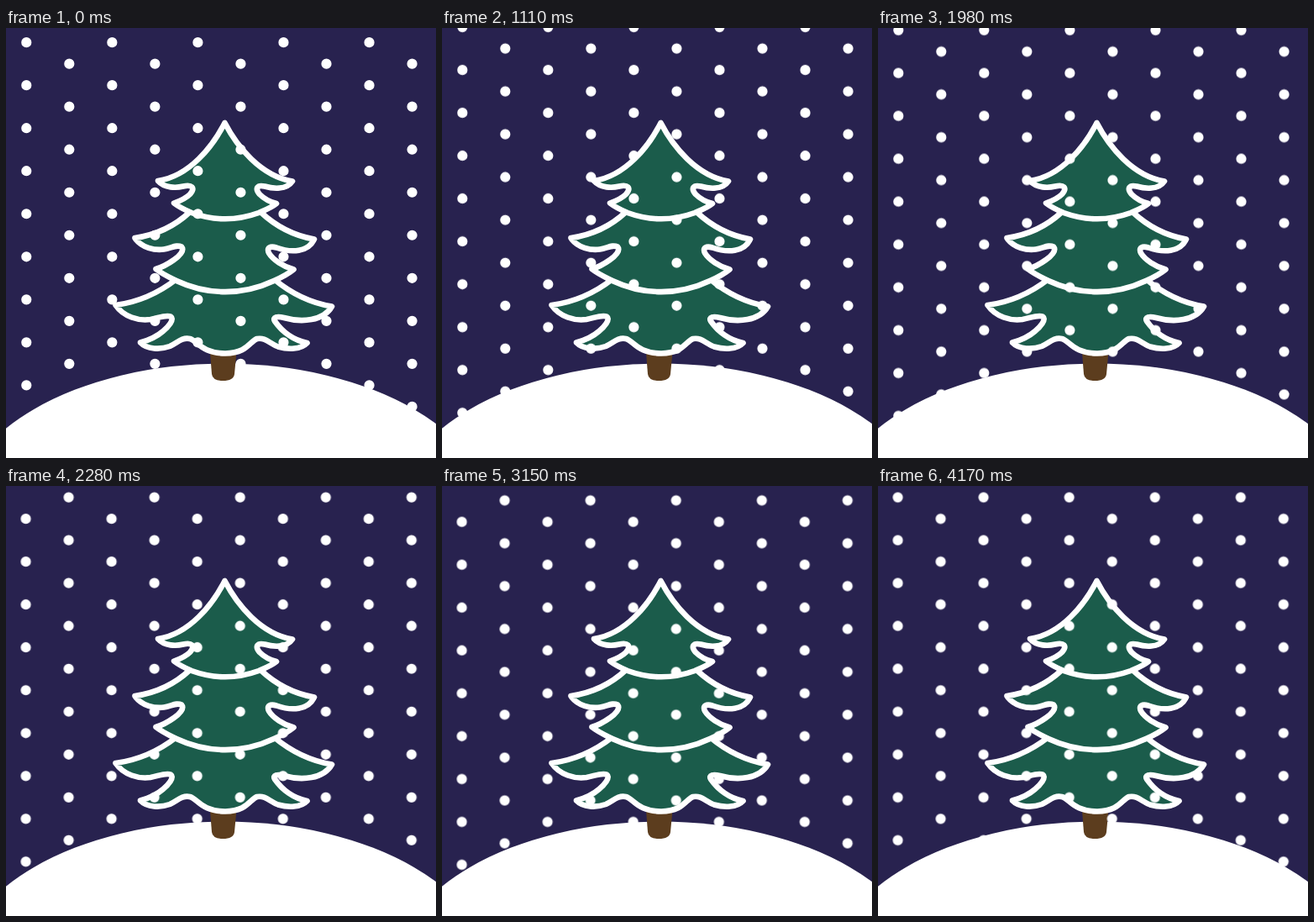
An HTML page that plays this animation: 512x512 px, repeating every 4.2 s.

```html
<!DOCTYPE html>
<html lang="en">
<head>
<meta charset="utf-8">
<title>Snowy tree</title>
<style>
  html, body { margin: 0; width: 100%; height: 100%; overflow: hidden; background: #28224f; }
  svg { display: block; width: 100vw; height: 100vh; }
  .tier { fill: #1b5c4b; stroke: #fff; stroke-width: 6.6; stroke-linejoin: round; }
  .snow { fill: none; stroke: #fff; stroke-width: 12.2; stroke-linecap: round; stroke-dasharray: .01 51.02; }
  /* one row of spacing per cycle, ten cycles per loop */
  .fall { animation: fall 420ms steps(14) infinite; }
  .drift { animation: drift 4200ms step-end infinite; }
  @keyframes fall { to { transform: translateY(51.03px); } }
  @keyframes drift { 50% { transform: translateX(-.7px); } }
</style>
</head>
<body>
<svg viewBox="0 0 512 512">
  <rect width="512" height="512" fill="#28224f"/>
  <ellipse cx="259.5" cy="585.5" rx="320" ry="186" fill="#fff"/>
  <rect y="500" width="512" height="12" fill="#fff"/>

  <path fill="#5c3d1e" d="M243 386H274.500L272 412Q271 420 258 420Q246 420 245 412Z"/>

  <path class="tier" d="M203 299C185 313 160 326 130.500 330
    C140 344 158 349 172 347C181 345.500 190 341 196 343.500C201 347 193 356 187 361
    C179 368 169 372 160 374.500C168 383 184 383 195 379C204 375 209 368 219 370
    C229 373 232 387 261 387.500C288 387 290 373 299 370C309 368 314 376 324 379.500
    C336 383 351 383 358.500 375C343 372 329 362 320 349C317 344 323 343 331 345
    C352 351 378 349 388 331.500C360 327 337 314 319 299Z"/>

  <path class="tier" d="M219 219C203 234 181 246 153.500 250
    C161 262 178 265 188 263.500C197 262 203 257.500 209 260.500C213 265 206 272 200 276
    C193 281 185 285 178.500 287C186 293 195 297 203 301
    C240 318.500 282 318.500 319 301C328 297 336 293 342.500 287.500
    C330 284 318 276 313 268C310 261 315 259.500 322 261.500C340 268 360 267 367 251.500
    C341 247 319 234 303 219Z"/>

  <path class="tier" d="M260.500 113C246 141 219 176 181 182
    C189 191 203 190.500 211 188.500C221 186 226 190 219 198C214 203 207 206 200 208.500
    C207 214 214 217 221 220C247 229.500 275 229.500 301 220C308 217 316 214 322 209
    C314 207 307 203 302 198C296 191 299 186.500 308 188.500C318 191.500 334 193 341 182.500
    C303 176 275 141 260.500 113Z"/>

  <g class="drift">
    <path class="snow fall" d="M24.300-84.930V530M126.360-84.930V530M228.420-84.930V530M330.480-84.930V530M432.540-84.930V530
      M75.330-59.420V530M177.390-59.420V530M279.450-59.420V530M381.510-59.420V530M483.570-59.420V530"/>
  </g>
</svg>
</body>
</html>
```
